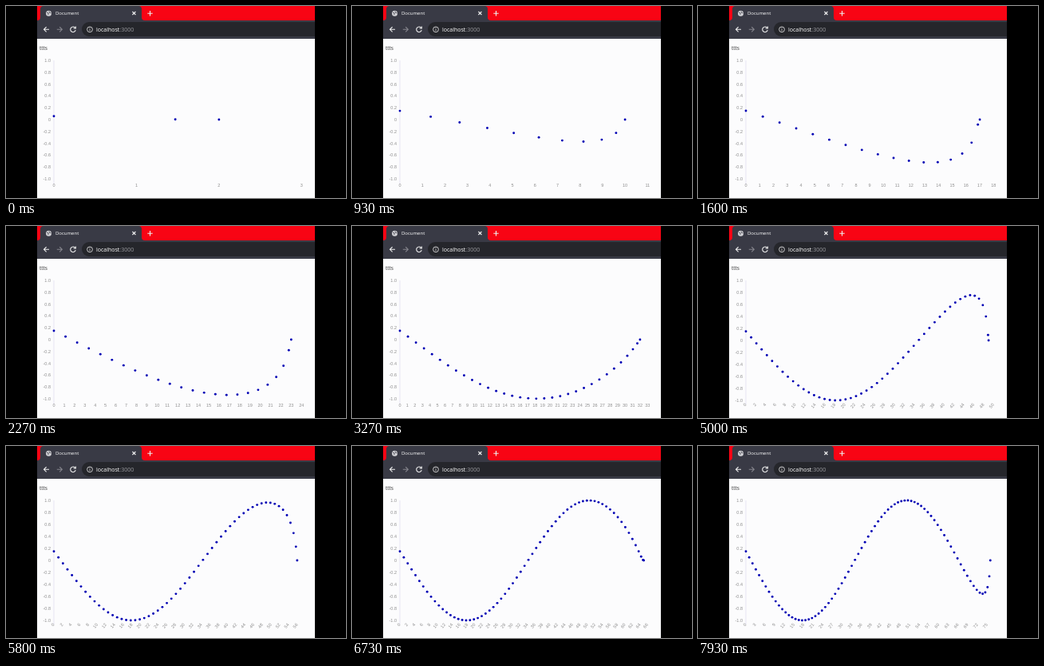
Recreate the animation shown at these times as an HTML page. Size 426 px wide and 240 px high, loop 8000 ms.

```html
<!DOCTYPE html>
<html lang="en">
<head>
<meta charset="utf-8">
<title>Live chart</title>
<style>
  html, body { margin: 0; width: 100%; height: 100%; overflow: hidden; background: #000; }
  svg { display: block; width: 100vw; height: 100vh; }
  .ui { font-family: "Open Sans", sans-serif; fill: #fff; }
  .icon { fill: none; stroke: #eee; stroke-width: 1.1; }
  .axis { font: 5.5px "Liberation Sans", sans-serif; fill: #8d8d8d; }
</style>
</head>
<body>
<svg viewBox="0 0 426 240">
  <rect width="426" height="240" fill="#000"/>
  <rect x="39" width="348" height="20" fill="#f80414"/>
  <path d="M39 18q4 0 4-4V4q0-4 4-4H166q4 0 4 4v10q0 4 4 4H387V41H39z" fill="#393a45"/>
  <path d="M387 20H104a9 9 0 0 0 0 18H387z" fill="#25262b"/>

  <circle cx="53.5" cy="9.2" r="3.5" fill="#d2d2d6"/>
  <path d="M51 8l2.3 1-.6 2M54 6.5l.5 1.8 2 .6" fill="none" stroke="#4a4a54" stroke-width=".9"/>
  <text class="ui" x="62" y="11.3" font-size="6">Document</text>
  <path class="icon" d="M158.4 7l4 4m0-4l-4 4M177.3 9.2h6.4m-3.2-3.2v6.4"/>

  <path class="icon" d="M54 29.3h-6.4m3-3.1l-3.1 3.1 3.1 3.1"/>
  <path class="icon" d="M63.8 29.3h6.4m-3-3.1l3.1 3.1-3.1 3.1" style="stroke:#85858d"/>
  <path class="icon" d="M86.5 27.2a3.3 3.3 0 1 0 .7 3M87.3 25.4v2.6h-2.6"/>
  <circle class="icon" cx="105" cy="29.3" r="3.4" style="stroke-width:.8"/>
  <path class="icon" d="M105 28.8v2.3M105 27.2v.8" style="stroke-width:.8"/>
  <text class="ui" x="113" y="31.8" font-size="7">localhost<tspan fill="#9b9ba0">:3000</tspan></text>

  <rect x="39" y="41" width="348" height="199" fill="#fcfcfd"/>
  <text x="42" y="55" font-size="8" font-family="Liberation Serif, serif" fill="#444">ttts</text>
  <path d="M60 68V223" stroke="#dedbee" stroke-width=".7"/>
  <g class="axis" id="yLabels" text-anchor="end"></g>
  <g class="axis" id="xLabels"></g>
  <g id="dots" fill="#0000b4"></g>
</svg>
<script>
const LOOP = 8000, INTERVAL = 106.2, LEAD = 15, FIRST_COUNT = 3;
const LEFT = 60, WIDTH = 310.3, TOP = 68;
const byId = id => document.getElementById(id);
const range = (count, fn) => Array.from({ length: count }, (_, i) => fn(i));

const valueAt = i => Math.sin(0.15 - 0.1 * i);
const easeOutQuart = p => 1 - (1 - p) ** 4;
const mix = (a, b, p) => a + (b - a) * p;

// The newest point rests on the zero line until the next one arrives.
function advance(points, elapsed) {
  const count = points.length;
  const p = easeOutQuart(Math.min(elapsed / 1000, 0.1));
  return points.map(([x, y], i) => i === count - 1
    ? [x, y]
    : [mix(x, i / count, p), mix(y, valueAt(i), p)]);
}

// startStates[n] holds the points at the moment the n-th one is added.
const startStates = [[], [[0, 0]]];
for (let n = 2; n < 90; n++) {
  startStates[n] = [...advance(startStates[n - 1], INTERVAL), [(n - 1) / n, 0]];
}

// Fifteen pictures per second, with delays of 70, 60 and 70 ms.
function frameTime(ms) {
  const part = ms % 200;
  return ms - part + (part >= 130 ? 130 : part >= 70 ? 70 : 0);
}

function drawAxes(count, rotated, unit) {
  byId("yLabels").innerHTML = range(11, i => {
    const label = i === 5 ? "0" : (1 - i / 5).toFixed(1);
    return `<text x="56" y="${TOP + i * unit / 5 + 2}">${label}</text>`;
  }).join("");

  const step = Math.ceil(8.8 * count / WIDTH);
  byId("xLabels").innerHTML = range(Math.floor(count / step) + 1, i => {
    const x = LEFT + WIDTH * i * step / count;
    const place = rotated
      ? `text-anchor="end" transform="translate(${x + 1} 223.5) rotate(-50)"`
      : `text-anchor="middle" x="${x}" y="225.5"`;
    return `<text ${place}>${i * step}</text>`;
  }).join("");
}

let drawnCount;
function draw(ms) {
  const t = frameTime(ms) + LEAD;
  const updates = Math.floor(t / INTERVAL);
  const count = FIRST_COUNT + updates;
  const rotated = count >= 35;
  const unit = rotated ? 75 : 74;

  if (count !== drawnCount) drawAxes(count, rotated, unit);
  drawnCount = count;

  byId("dots").innerHTML = advance(startStates[count], t - updates * INTERVAL)
    .map(([x, y]) => `<circle cx="${LEFT + WIDTH * x}" cy="${TOP + unit * (1 - y)}" r="1.45"/>`)
    .join("");
}

const start = performance.now();
function tick() {
  draw((performance.now() - start) % LOOP);
  requestAnimationFrame(tick);
}
tick();
</script>
</body>
</html>
```
